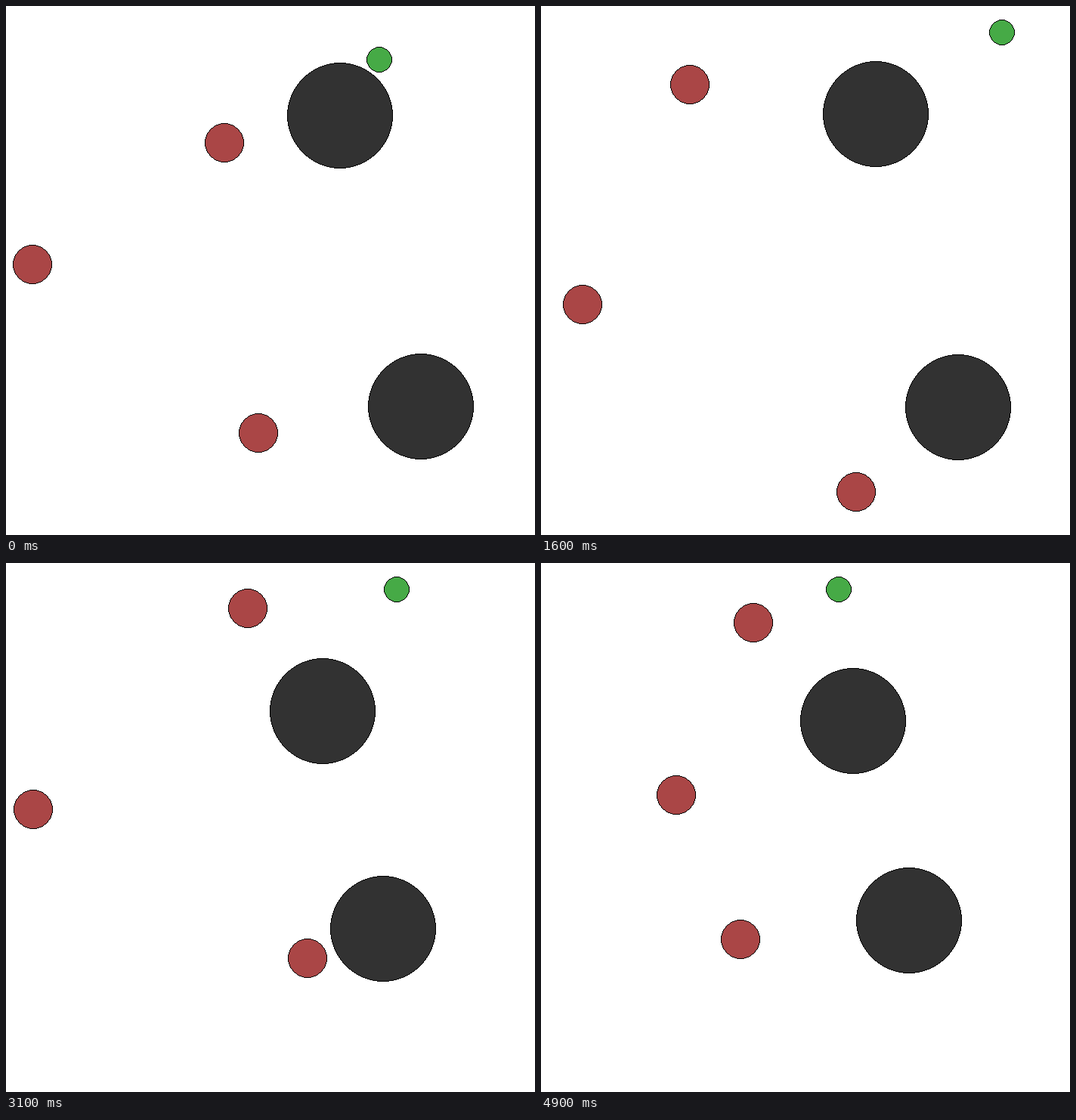
These frames come from a looping animation (700x700 px, 5 s). An HTML page with a canvas:

```html
<!DOCTYPE html>
<html lang="en">
<head>
<meta charset="utf-8">
<title>Pursuit</title>
<style>
html, body { margin: 0; width: 100%; height: 100%; overflow: hidden; background: #fff; }
canvas { display: block; width: 100vw; height: 100vh; image-rendering: pixelated; }
</style>
</head>
<body>
<canvas id="stage" width="700" height="700"></canvas>
<script>
const STEP = 100, STEPS = 50, HALF = 350, REACH = 315;
const RED = '#aa4646', GREEN = '#46aa46', DARK = '#323232';
const ctx = document.getElementById('stage').getContext('2d');

// Steps at which the movers pass their waypoints, given in world space
const moments = [0, 7, 16, 21, 27, 35, 41, 45, 49];

const mover = (r, fill, x, y) => ({ r, fill, at: t => [spline(x, t), spline(y, t)] });
const obstacle = (x, y) => ({ r: 70, fill: DARK, at: () => [x, y] });

const bodies = [
  mover(26, RED,
    [-315, -295.5, -291.4, -318, -412.7, -395.3, -288.6, -246, -248.2],
    [-7.5, 26.7, 45, 30, -4.9, -53, -69, -68, -61.9]),
  mover(26, RED,
    [-60.5, -137.4, -150.9, -110, -58, -28.7, -23.4, -50, -99.7],
    [-168.5, -145.9, -243, -300, -359.6, -402.3, -399.7, -400, -393.7]),
  mover(26, RED,
    [-15.5, -0.5, 66.8, 93, 105.4, 19.8, -3.3, -58, -124.5],
    [215.5, 242.5, 290.5, 325, 289.8, 185.8, 210.9, 249, 216.2]),
  mover(17, GREEN,
    [144.5, 254.7, 257.8, 258, 246.5, 189.7, 121.2, 93, 64.8],
    [-278.5, -295, -311.7, -328, -439.9, -386.3, -421.8, -434, -458.5]),
  obstacle(92.93, -204.4),
  obstacle(199.95, 180.05)
];

const span = i => moments[i + 1] - moments[i];
const slope = (p, i) => (p[i + 1] - p[i]) / span(i);

// Parabolic tangent, held back where a steep run meets a flat one
function tangent(p, i) {
  if (i === 0) return slope(p, 0);
  if (i === p.length - 1) return slope(p, i - 1);
  const a = slope(p, i - 1), b = slope(p, i);
  const m = (a * span(i) + b * span(i - 1)) / (span(i - 1) + span(i));
  if (a * b < 0) return m;
  return Math.sign(m) * Math.min(Math.abs(m), 3 * Math.abs(a), 3 * Math.abs(b));
}

function spline(p, t) {
  let i = 0;
  while (i < p.length - 2 && t >= moments[i + 1]) i++;
  const h = span(i), u = (t - moments[i]) / h, v = 1 - u;
  return p[i] * (1 + 2 * u) * v * v + tangent(p, i) * h * u * v * v
    + p[i + 1] * u * u * (3 - 2 * u) - tangent(p, i + 1) * h * u * u * v;
}

// Midpoint walk over one eighth of a circle
function octant(r) {
  const points = [];
  let x = 0, y = r, f = 1 - r;
  while (x < y) {
    if (f >= 0) f -= 2 * --y;
    f += 2 * ++x + 1;
    points.push([x, y], [y, x]);
  }
  return points;
}

// Hard-edged disc with a one pixel outline
function disc(cx, cy, r, fill) {
  const points = octant(r);
  ctx.fillStyle = fill;
  for (const [x, y] of points) ctx.fillRect(cx - x, cy - y, 2 * x, 2 * y);
  ctx.fillStyle = '#000';
  for (const [x, y] of points) {
    for (const px of [cx - x, cx + x - 1]) {
      for (const py of [cy - y, cy + y - 1]) ctx.fillRect(px, py, 1, 1);
    }
  }
}

// The camera zooms so that the farthest body always touches the margin
function draw(step) {
  const places = bodies.map(b => b.at(step));
  const range = Math.max(...places.flat().map(Math.abs));
  const toScreen = v => Math.floor(v / range * REACH + HALF + 1e-6);
  ctx.fillStyle = '#fff';
  ctx.fillRect(0, 0, 2 * HALF, 2 * HALF);
  bodies.forEach((b, i) => disc(...places[i].map(toScreen), b.r, b.fill));
}

const start = performance.now();
function tick() {
  const elapsed = performance.now() - start;
  draw(Math.floor(elapsed / STEP) % STEPS);
  requestAnimationFrame(tick);
}
tick();
</script>
</body>
</html>
```
